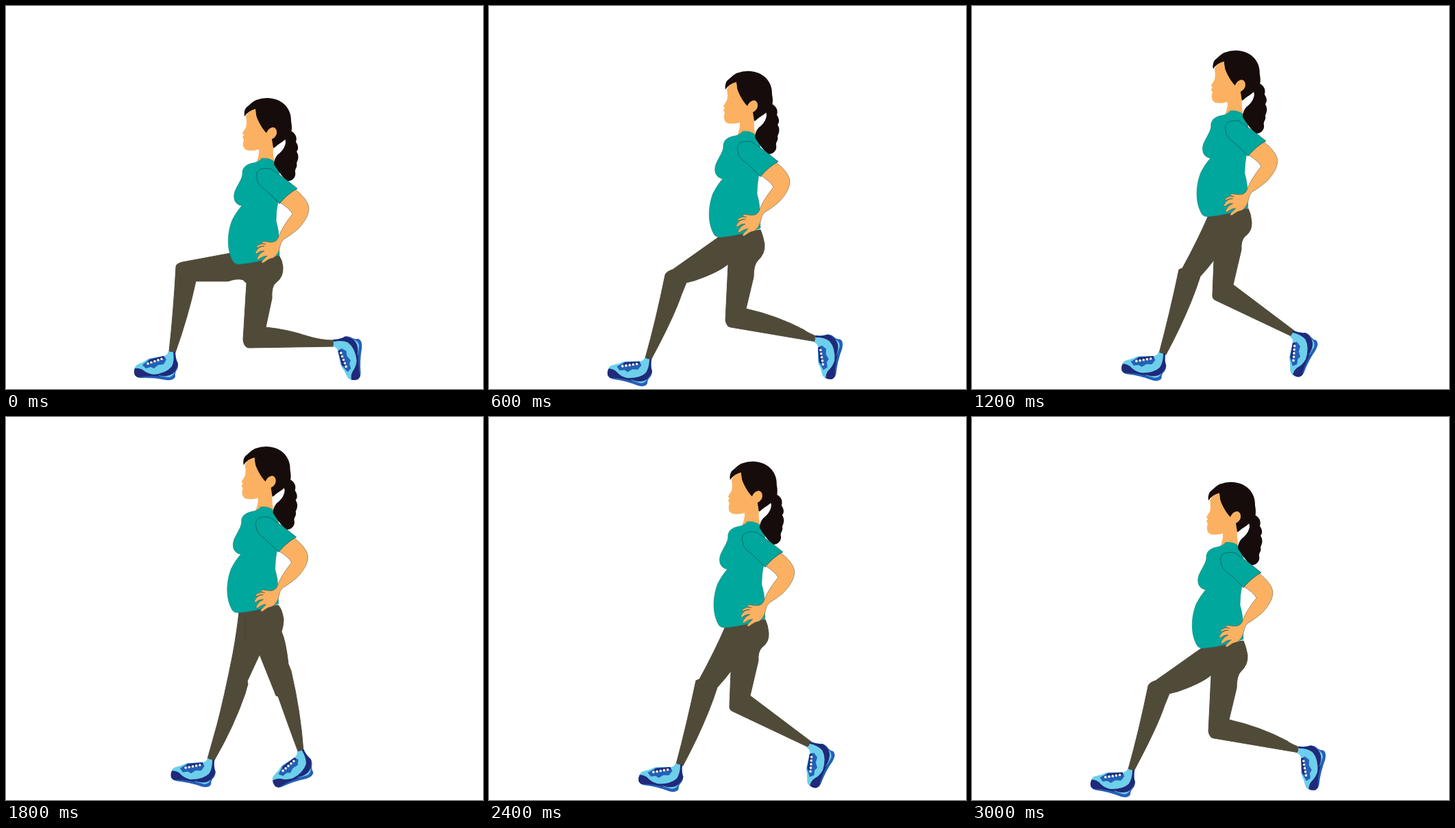
Write an HTML page with a canvas that moves like this. It is 696 by 558 pixels and loops after 3600 ms.

```html
<!DOCTYPE html>
<html lang="en">
<head>
<meta charset="utf-8">
<title>Lunge exercise</title>
<style>
  html, body { margin: 0; width: 100%; height: 100%; overflow: hidden; background: #fff; }
  canvas { display: block; }
</style>
</head>
<body>
<canvas id="stage" width="696" height="558"></canvas>
<script>
const ctx = document.getElementById('stage').getContext('2d');

const SKIN = '#fbb161', HAIR = '#160c0b', SHIRT = '#00a79d', PANTS = '#504a39';
const SKY = '#6dcfea', BLUE = '#2460b8', NAVY = '#20297a', LINE = '#4b4a3c';
const STEP = 600;
const ORDER = [0, 1, 2, 3, 2, 1];

// Each pose: torso offset, legs outline, and shoes as [ankle x, ankle y, degrees].
const POSES = [
  {
    torso: [0, 0],
    legs: `M328 360 L258 373 Q248 375 248 380 Q244 450 238 503 L247 505
      Q266 452 277 401 L324 401 Q338 396 346 399 L351 404 L346 486 Q347 497 354 498
      L478 496 L477 487 Q460 487 440 481 Q410 471 379 468 L388 426 Q387 408 394 403
      Q405 395 404 380 Q403 370 398 363 Z`,
    shoes: [[242, 505, 0], [479, 491, -92]]
  },
  {
    torso: [-3, -39.3],
    legs: `M336 336 L268 384 Q258 387 257 392 Q243 460 228 513 L236 516
      Q270 453 281 420 L288 403 L300 400 Q335 388 349 376 L345 458 Q347 468 353 468
      L477 489 L475 480 Q463 475 460 472 Q420 451 375 441 L386 395 Q386 377 392 371
      Q403 361 402 347 Q400 335 396 326 Z`,
    shoes: [[232, 515, 10], [477, 485, -81]]
  },
  {
    torso: [3.8, -69.3],
    legs: `M345 305 Q330 340 307 382 L302 384 Q288 450 273 506 L283 508
      Q305 467 320 430 Q328 410 333 394 Q345 381 353 370 L351 420 Q350 427 356 429
      L466 481 L470 473 L381 406 L393 355 Q392 342 398 336 Q409 328 408 315
      Q407 303 403 295 Z`,
    shoes: [[277, 507, 9], [468, 478, -67]]
  },
  {
    torso: [-1.4, -91],
    legs: `M340 284 Q337 312 331 345 Q318 410 308 448 L294 498 L304 500
      Q332 452 349 403 Q352 392 353 389 L352 385 L370 346 L394 406 L397 407
      Q414 455 426 487 L434 487 Q430 430 416 370 L412 360 Q408 325 402 313
      Q405 303 405 295 Q403 280 397 274 Z`,
    seam: 'M349 290 V330',
    shoes: [[299, 500, 8], [430, 487, -23]]
  }
];

const HAIR_CAP = `M348 161 Q346 150 354 145 Q364 134 381 134 C401 134 417 148 416 168
  Q418 179 416 184 Q410 193 403 198 Q396 202 391 207 L380 200 L366 172 L364 151
  Q354 152 348 161 Z`;
const PONYTAIL = `M412 181 C420 182 426 190 423 198 C427 204 427 209 424 212
  C429 220 425 226 424 229 C426 235 421 237 422 242 C424 250 416 256 411 255
  Q403 250 391 231 Q391 223 396 217 Q405 210 407 203 Q409 198 407 194 Z`;
const FACE = `M364 150 Q354 152 350 161 Q352 169 350 177 L345 185 L347 188 L345 191
  L347 195 L346 199 Q345 207 351 210 Q360 212 369 209 Q370 216 365 229
  Q378 234 392 227 Q389 216 390 207 L388 194 Q396 190 395 182
  Q393 176 388 177 Q383 178 380 185 Q374 179 369 169 Q364 160 364 150 Z`;
const TOP = `M364 228 Q370 226 373 222 Q382 221 389 225 L398 234
  Q400 250 397 284 Q394 299 394 313 Q399 329 398 345 L399 363 Q372 373 343 376
  Q336 377 332 373 C321 355 323 330 330 312 Q336 300 344 291
  C333 289 331 279 334 270 C339 258 346 251 345 241 C347 232 354 230 364 228 Z`;
const SLEEVE = `M366 250 C364 239 372 235 386 237 Q406 250 425 266 Q411 273 399 288
  Q383 271 372 263 Q366 257 366 250 Z`;
const ARM = `M399 286 L422 267 Q438 280 441 290 C445 302 434 317 426 325
  Q414 335 405 340 Q401 344 400 350 Q398 362 390 367 Q383 368 376 374
  Q371 375 374 371 L381 364 Q375 364 369 369 Q365 370 367 366 Q371 359 377 357
  Q371 356 366 361 Q362 361 365 357 Q369 350 377 350 Q373 349 367 352
  Q364 352 367 349 Q373 345 379 347 Q374 346 373 344 Q374 342 384 344
  Q394 345 397 338 Q402 323 418 303 Q414 295 399 286 Z`;

const SHOE_SOLE = `M-54 28 Q-55 36 -46 37 Q-27 36 -8 40 Q3 41 5 35 Q4 31 6 27
  Q11 20 8 15 L1 24 Z`;
const SHOE_UPPER = `M-54 33 Q-57 20 -49 17 Q-41 14 -34 9 L-12 5 Q-6 4 -5 -2
  Q1 1 5 -2 Q5 9 9 16 Q9 21 4 28 Q2 35 -5 36 Q-28 32 -54 33 Z`;
const SHOE_HEEL = `M5 -2 Q5 9 9 16 Q9 21 4 28 Q-2 35 -14 34 L-27 32
  Q-8 30 0 20 Q4 12 2 -1 Z`;
const SHOE_TOE = `M-54 33 Q-56 27 -54 23 Q-46 22 -40 27 Q-33 32 -22 32
  L-16 35 Q-35 33 -50 36 Z`;
const SHOE_TONGUE = `M-43 18 L-32 9 L-12 5 L-8 10 L-12 17 L-20 18 L-26 23
  L-31 21 L-38 23 Z`;

function shape(d, fill, stroke, width = 0.7) {
  const path = new Path2D(d);
  if (fill) {
    ctx.fillStyle = fill;
    ctx.fill(path);
  }
  if (stroke) {
    ctx.strokeStyle = stroke;
    ctx.lineWidth = width;
    ctx.stroke(path);
  }
}

function drawShoe([x, y, degrees]) {
  ctx.save();
  ctx.translate(x, y);
  ctx.rotate(degrees * Math.PI / 180);
  shape(SHOE_UPPER, SKY);
  shape(SHOE_SOLE, BLUE);
  shape(SHOE_UPPER, SKY);
  shape(SHOE_HEEL, NAVY);
  shape(SHOE_TOE, NAVY);
  shape(SHOE_TONGUE, BLUE);
  shape('M-34 11 L-12 5 L-10 8 L-33 15 Z', NAVY);
  ctx.fillStyle = '#fff8dc';
  for (let i = 0; i < 5; i++) {
    ctx.beginPath();
    ctx.arc(-35 + i * 5, 16 - i * 1.7, 1.8, 0, 2 * Math.PI);
    ctx.fill();
  }
  ctx.restore();
}

function drawTorso([dx, dy]) {
  ctx.save();
  ctx.translate(dx, dy);
  shape(HAIR_CAP, HAIR);
  shape(FACE, SKIN);
  shape(TOP, SHIRT, '#16877f', 0.6);
  shape(PONYTAIL, HAIR);
  shape(ARM, SKIN, LINE, 0.5);
  shape(SLEEVE, SHIRT, '#17504c', 0.7);
  ctx.restore();
}

function draw(now) {
  const pose = POSES[ORDER[Math.floor(now / STEP) % ORDER.length]];
  ctx.fillStyle = '#fff';
  ctx.fillRect(0, 0, 696, 558);
  shape(pose.legs, PANTS, PANTS, 1);
  if (pose.seam) shape(pose.seam, null, '#45402f', 0.6);
  pose.shoes.forEach(drawShoe);
  drawTorso(pose.torso);
}

const start = performance.now();
function tick() {
  draw(performance.now() - start);
  requestAnimationFrame(tick);
}
tick();
</script>
</body>
</html>
```
